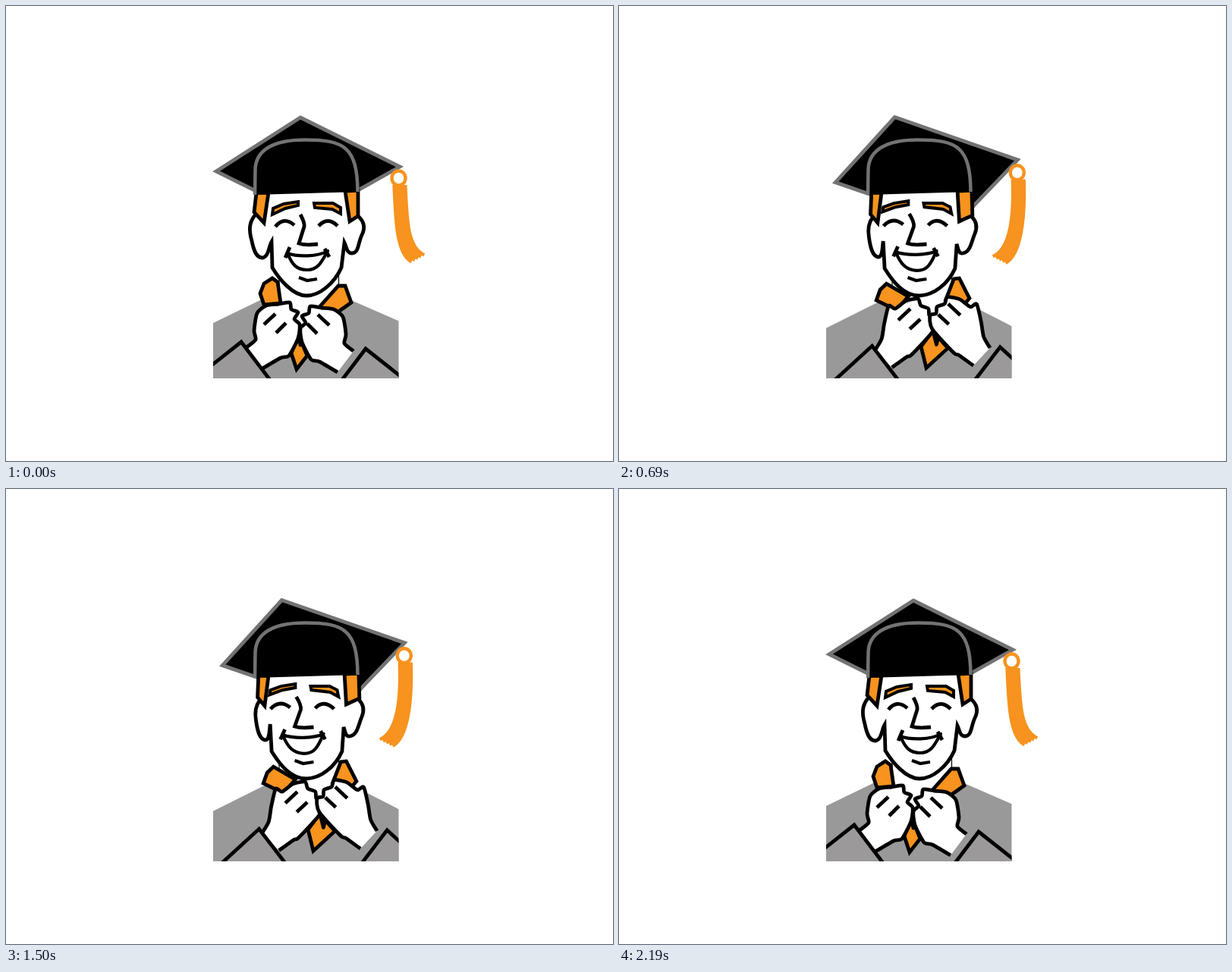
Animation, 800 px wide and 600 px high, one loop 2.22 s. Source, as an HTML page:

```html
<!DOCTYPE html>
<html lang="en">
<head>
<meta charset="utf-8">
<title>Graduate</title>
<style>
html, body { margin: 0; width: 100%; height: 100%; overflow: hidden; background: #fff; }
svg { display: block; width: 800px; height: 600px; }
</style>
</head>
<body>
<svg id="stage" viewBox="0 0 800 600">
  <defs><clipPath id="bust"><rect x="273" y="100" width="244.5" height="391"/></clipPath></defs>
</svg>
<script>
const STEP = 30, LAST = 36;
const ORANGE = '#f7931e', GREY = '#999', SLEEVE = '#9b999a', EDGE = '#737373';
const stage = document.getElementById('stage');
const { PI, sin, cos, abs, max, floor } = Math;

// Motion curves over the steps 0 to LAST
const turn = s => sin(PI * (s / LAST) ** 1.1) ** 1.5;
const sway = s => sin(PI * s / LAST);
const late = s => max(0, 2 * s / LAST - 1);
const SWINGS = [[0, 25], [7, 3], [11, 40], [16, 4], [23, -24], [29, -14], [36, 42]];
function swing(s) {
  const i = max(1, SWINGS.findIndex(([at]) => at >= s));
  const [[t0, v0], [t1, v1]] = [SWINGS[i - 1], SWINGS[i]];
  return v0 + (v1 - v0) * (1 - cos(PI * (s - t0) / (t1 - t0))) / 2;
}

// Mixes the numbers of two path strings.
const NUMBER = /-?[\d.]+/g;
const nums = text => text.match(NUMBER).map(Number);
function mix(a, b, u) {
  const to = nums(b);
  let i = 0;
  return a.replace(NUMBER, v => (+v + (to[i++] - v) * u).toFixed(2));
}
// Points that sway from a to b and drift by (dx, dy) in the second half.
const pose = (a, b, dx, dy) => s =>
  nums(mix(a, b, sway(s))).map((v, i) => v + late(s) * (i % 2 ? dy : dx));
// The right arm mirrors the left one about a moving axis.
const mirror = (points, dx, dy) => s => points(s).map((v, i) => i % 2
  ? v + 5 - 6 * sway(s) - 7 * late(s) + dy
  : 775 + 48 * sway(s) + 30 * late(s) - v + dx);

// Path builders from flat coordinate lists
const pairs = n => n.flatMap((x, i) => i % 2 ? [] : [[x, n[i + 1]]]);
const line = n => 'M' + pairs(n).join('L');
const shape = n => line(n) + 'Z';
const dashes = n => line(n.slice(0, 4)) + line(n.slice(4));
function smooth(n, k = 0.12) {
  const p = pairs(n), at = i => p[Math.min(max(i, 0), p.length - 1)];
  const lean = (i, side) => at(i).map((v, j) => v + side * k * (at(i + 1)[j] - at(i - 1)[j]));
  return 'M' + p[0] + p.slice(1).map((q, i) => `C${lean(i, 1)} ${lean(i + 1, -1)} ${q}`).join('');
}

const parts = [];
function add(build, fill, stroke = 'none', width = 4.8, extra = {}) {
  const el = document.createElementNS('http://www.w3.org/2000/svg', 'path');
  const attrs = { fill, stroke, 'stroke-width': width, ...extra };
  for (const k in attrs) el.setAttribute(k, attrs[k]);
  stage.append(el);
  if (typeof build === 'string') el.setAttribute('d', build);
  else parts.push([el, build]);
}
const head = (a, b, ...style) => add(s => mix(a, b, turn(s)), ...style);
const clip = { 'clip-path': 'url(#bust)' }, round = { 'stroke-linejoin': 'round' };

// Gown, neck and collar
const shoulders = pose('250 429 337 387 455 388 560 434', '250 434 340 389 470 396 560 443', 3, 8);
const collarL = pose('335 379 340 366 351 359 358 364 362 392 340 394',
  '339 389 344 375 352 367 383 385 366 402 358 397', 2, 0);
const collarR = pose('438 369 447 369 455 391 434 406 413 397',
  '441 362 448 361 462 388 455 397 432 389', 2, -10);
const notch = pose('385 432 388 447 391 438', '412 430 417 449 421 432', 15, -9);
const tie = pose('376 458 385 432 397 461 383 479', '396 450 412 430 433 452 403 479', 14, -6);

add(s => shape([...shoulders(s), 560, 495, 250, 495]), GREY, 'none', 0, clip);
add(s => {
  const l = collarL(s), r = collarR(s), n = notch(s);
  return shape([360, 350, 438, 350, 438, 369, r[8], r[9], n[2], n[3], l[8], l[9], 360, 380]);
}, '#fff');
add('M360 358V378M438.5 352V370', 'none', '#000', 1.2);
for (const collar of [collarL, collarR]) add(s => shape(collar(s)), ORANGE, '#000');

// Mortarboard and face
head('M388 147L519 212L464 243L408 283L277 218Z', 'M361 146.5L526 202L470 263L451 289L286 234Z', '#000', EDGE);
add('M331 246L329 282H464V245Z', '#fff');
head('M328 276C320 286 320 296 324 310C327 325 331 332 338 332C346 331 346 318 350 311L351 345C360 360 378 382 396 382C414 382 433 365 442 345L446 312C449 318 449 326 456 326C465 326 464 312 469 302C474 292 472 284 464 277',
  'M335 279C328 288 329 298 330 305C332 320 335 330 342 331C348 331 347 318 348 310L350 346C360 362 374 382 396 382C416 381 434 366 443 346L445 314C447 322 448 327 453 326C463 324 464 312 469 300C473 290 470 283 465 278',
  '#fff', '#000');
head('M330 246L327 272L340 286L346 246Z', 'M333 246L332 275L341 286L346 246Z', ORANGE, '#000');
head('M447 244L453 284L464 277L464 243Z', 'M446 244L448 284L466 276L465 243Z', ORANGE, '#000');
head('M351 275L352 267L366 261L385 258L385 263L368 267Z', 'M347 271L348 265L362 260L381 257L381 262L364 265Z', ORANGE, '#000', 4);
head('M406 260L431 260L441 266L441 274L430 268L407 266Z', 'M401 260L426 260L436 265L438 274L427 268L402 265Z', ORANGE, '#000', 4);
head('M355 291Q366 277 380 289M412 290Q424 277 437 290', 'M348 290Q360 277 374 288M407 289Q418 277 432 290', 'none', '#000');
head('M388 275Q394 286 393 291L386 313Q394 316 411 314', 'M382 274Q389 285 388 291L380 313Q388 316 405 314', 'none', '#000');
head('M371 326C384 331 411 331 424 323C415 339 411 348 397 348C383 348 377 341 371 326',
  'M364 324C378 329 405 329 418 323C411 339 407 349 392 349C378 348 371 341 364 324', '#fff', '#000', 4.2, round);
head('M374 318L368 332M420 320L426 331', 'M367 317L361 330M414 319L420 330', 'none', '#000');
head('M386 358L397 362L410 360', 'M380 358L391 362L405 360', 'none', '#000', 4.2);

// Crown
const crown = 'M328 249L328.5 216C329 190 352 176.5 394 176.5C446 176.5 463 186 463.5 245';
add(crown + 'Z', '#000');
add(crown, 'none', EDGE, 4.5);

// Tie, hands, sleeves
const hand = pose(
  '317 450 329 440 327 428 331 405 343 395 359 393 374 391 376 400 385 404 380 413 387 420 385 438 373 461 362 464 338 478',
  '336 456 344 441 348 420 354 397 362 402 376 391 392 388 396 397 406 401 408 410 416 412 413 430 383 462 377 465 358 479', 13, -8);
const fingers = pose('340 420 355 406 356 431 369 418', '367 416 383 401 382 428 396 415', 13, -8);
const sleeve = pose('234 503 310 443 354 501', '272 506 332 450 378 510', 13, -4);

add(s => shape(tie(s)), ORANGE, '#000');
add(s => line(notch(s)), '#fff', '#000', 4.8, round);
for (const side of [p => p, mirror]) {
  const palm = side(hand, 0, 0), creases = side(fingers, -9, -4), cuff = side(sleeve, 9, 4);
  add(s => smooth(palm(s)), '#fff', '#000', 4.8, round);
  add(s => dashes(creases(s)), 'none', '#000');
  add(s => line(cuff(s)), SLEEVE, '#000', 4.8, clip);
}

// Tassel: strands hang from a ring at the board's corner
const ring = s => [517.5 + 8 * turn(s), 227 - 8 * turn(s)];
add(s => {
  const [rx, ry] = ring(s), w = swing(s);
  let d = '';
  for (let i = 0; i < 5; i++) {
    const x = rx - 6 + i * 3.7, y = ry + 9;
    const drop = 110 - 0.35 * abs(w) - 0.09 * i * w;
    d += `M${x} ${y}C${x + 2} ${y + 50} ${x + w * 0.15} ${y + drop * 0.9} ${x + w - 2 + i * 0.5} ${y + drop}`;
  }
  return d;
}, 'none', ORANGE, 4.4);
add(s => {
  const [x, y] = ring(s);
  return `M${x - 9} ${y}a9 9.5 0 1 1 18 0a9 9.5 0 1 1 -18 0Z`;
}, '#fff', ORANGE, 4.4);

// Plays forward, then back, with each end held for two steps.
let start;
function draw(now) {
  start ??= now;
  const n = floor(max(0, now - start) / STEP) % (2 * LAST + 2);
  const step = n <= LAST ? n : 2 * LAST + 1 - n;
  for (const [el, build] of parts) el.setAttribute('d', build(step));
  requestAnimationFrame(draw);
}
draw(performance.now());
</script>
</body>
</html>
```
